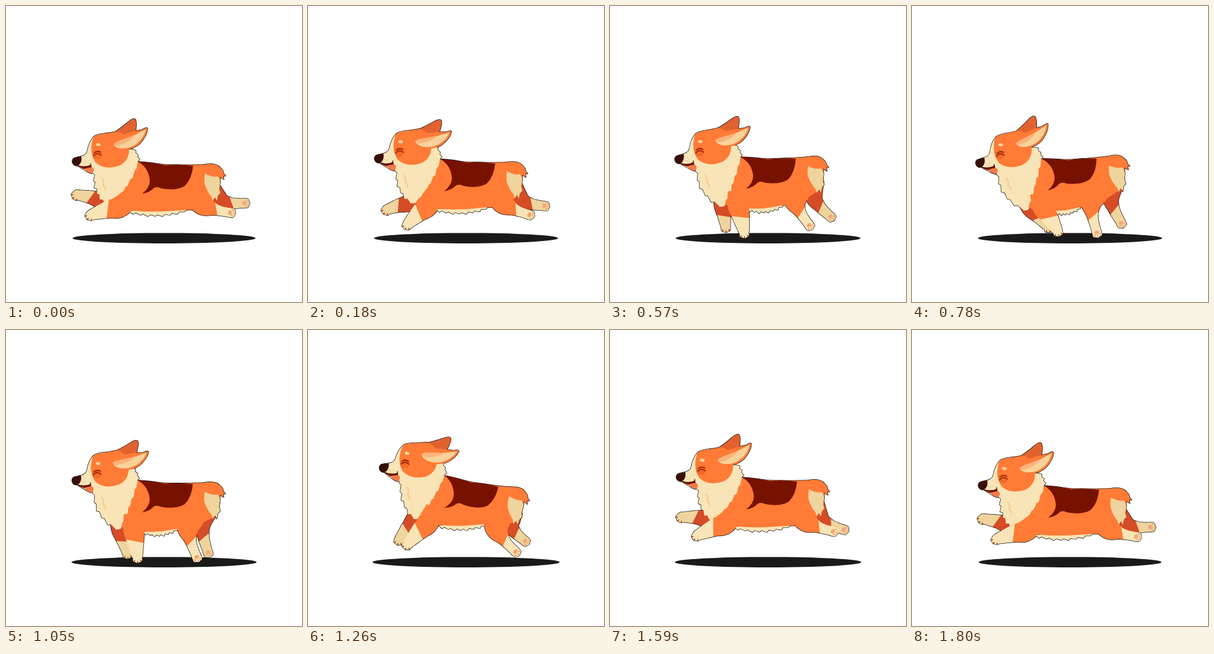
Animation, 500 px wide and 500 px high, one loop 1.83 s. Source, as an HTML page with a canvas:

```html
<!DOCTYPE html>
<html lang="en">
<head>
<meta charset="utf-8">
<title>Running corgi</title>
<style>
html, body { margin: 0; width: 100%; height: 100%; overflow: hidden; background: #fff; }
canvas { display: block; width: 500px; height: 500px; }
</style>
</head>
<body>
<canvas id="stage" width="500" height="500"></canvas>
<script>
const ctx = document.getElementById('stage').getContext('2d');

const LOOP = 1830, STRIDE = 1800, STEP = 30;

const C = {
  orange: '#ff7b36', deep: '#d54c26', ear: '#e0622f', cream: '#f8e4b6',
  tan: '#efd49d', patch: '#781200', dark: '#380e06', red: '#8c1c08',
  pad: '#f2a779', shadow: '#1a1a1a'
};

// time, withers height, body turn, then the paws: near fore, far fore, near hind, far hind
const KEYS = [
  [0, 263, 0, 143, 353, 120, 319, 378, 349, 402, 333],
  [360, 253, 0, 197, 382, 154, 367, 363, 357, 390, 345],
  [780, 258, -4.5, 246, 380, 230, 373, 312, 382, 353, 366],
  [1050, 254, -.5, 222, 384, 205, 377, 322, 383, 341, 375],
  [1260, 246, 7.4, 168, 362, 154, 354, 350, 374, 366, 356],
  [1425, 242, 4, 154, 348, 131, 329, 365, 353, 382, 342],
  [1590, 249, 0, 147, 347, 121, 316, 376, 340, 394, 337]
];

// Rest positions that parts turn about.
const WITHERS = [223, 263], EYE = [153, 250], EAR = [185, 228];

// hip, half widths, joints as [share of the leg, bow per forward reach, fixed bow]
const FORE = { hip: [213, 319], widths: [15, 18, 14.5, 8.5], joints: [[.35, .12, 0], [.62, .06, 0]], skew: .2 };
const FORE_FAR = { ...FORE, hip: [187, 325], widths: [13, 14, 11, 8], joints: [[.35, .08, 0], [.66, .03, 0]] };
const HIND = { hip: [318, 310], widths: [26, 20, 9.5, 7.5], joints: [[.38, 0, -12], [.68, 0, -9]], skew: -.2, pads: true };
const HIND_FAR = { ...HIND, hip: [345, 308], widths: [16, 14, 9.5, 7.5] };

const back = [[200, 262], [223, 263], [270, 269], [335, 268], [357, 267], [362, 290], [358, 318], [348, 328]];

const shape = d => new Path2D(d);
const tail = shape('M333 268 Q354 264 361 273 Q367 278 366 282 L370 287 L366 287 L367 293 L361 289 L356 288 L338 292Z');
const rump = shape('M335 283 Q333 296 335 302 Q339 314 346 322 L348 329 L352 323 L355 329 L357 320 L361 316 L359 308 L361 298 Q359 290 357 288 Q347 290 335 283Z');
const saddle = shape('M222 263 Q245 264 268 269 Q290 267 315 270 Q313 292 301 304 Q286 313 261 308 Q253 304 248 308 Q242 315 229 317 Q242 307 242 295 Q240 273 222 263Z');
const skull = shape('M111 263 Q112 257 122 255 Q134 253 136 246 Q139 229 148 220 Q155 216 168 215 L205 238 L200 270 L152 280 Q146 283 139 281 Q128 276 121 270Z');
const face = shape('M147 221 C155 215 170 216 185 212 Q206 214 207 242 Q207 262 190 270 Q165 278 150 264 Q143 253 143 240 Q144 227 147 221Z');
const nose = shape('M111 263 Q111 257 117 256 L126 254 Q128 262 123 268 L118 270 Q112 269 111 263Z');
const jaw = shape('M119 269 Q132 273 143 268 L144 275 Q134 280 119 269Z');
const tongue = shape('M132 275 Q140 272 146 273 Q150 279 143 283 Q135 281 132 275Z');
const smile = shape('M119 269 Q132 274 140 271 Q143 269 142 266');
const lids = shape('M147 253 Q153 246 160 252 M148 248 Q153 244 159 247');
const mark = shape('M161 291 Q166 297 163 303 Q168 306 167 311');
const farEar = shape('M170 222 Q190 208 204 195 Q212 187 216 190 Q219 196 217 212 L200 226Z');
const nearEar = shape('M178 231 C184 219 210 211 228 207 Q237 201 237 205 Q237 216 226 230 Q215 241 200 242 Q184 242 178 231Z');
const earInside = shape('M181 234 C186 227 206 223 222 213 L234 206 C232 222 218 236 204 239 Q187 243 181 234Z');
const earShade = shape('M181 234 C186 227 203 224 216 217 Q209 228 192 235 Q184 238 181 234Z');

// Smooth curve through the key poses, closed over one stride.
function pose(t) {
  const n = KEYS.length;
  const key = i => KEYS[(i + n) % n];
  const time = i => key(i)[0] + STRIDE * Math.floor(i / n);
  let i = n - 1;
  while (time(i) > t) i--;
  const span = time(i + 1) - time(i), u = (t - time(i)) / span;
  return key(i).map((a, k) => {
    const b = key(i + 1)[k];
    const ma = (b - key(i - 1)[k]) / (time(i + 1) - time(i - 1)) * span;
    const mb = (key(i + 2)[k] - a) / (time(i + 2) - time(i)) * span;
    return hermite(a, b, ma, mb, u);
  });
}

function hermite(a, b, ma, mb, u) {
  return a + u * (ma + u * (3 * (b - a) - 2 * ma - mb + u * (2 * (a - b) + ma + mb)));
}

const rad = deg => deg * Math.PI / 180;

function place([x, y], [rx, ry], [px, py, turn]) {
  const c = Math.cos(rad(turn)), s = Math.sin(rad(turn));
  return [px + (x - rx) * c - (y - ry) * s, py + (x - rx) * s + (y - ry) * c];
}

function within([rx, ry], [px, py, turn], draw) {
  ctx.save();
  ctx.translate(px, py);
  ctx.rotate(rad(turn));
  ctx.translate(-rx, -ry);
  draw();
  ctx.restore();
}

function poly(points) {
  const p = new Path2D();
  points.forEach(q => p.lineTo(...q));
  p.closePath();
  return p;
}

function soft(points) {
  const p = new Path2D(), n = points.length;
  for (let i = 0; i <= n; i++) {
    const [x, y] = points[i % n], [nx, ny] = points[(i + 1) % n];
    const mid = [(x + nx) / 2, (y + ny) / 2];
    if (i) p.quadraticCurveTo(x, y, ...mid);
    else p.moveTo(...mid);
  }
  return p;
}

function oval(x, y, rx, ry, turn = 0) {
  const p = new Path2D();
  p.ellipse(x, y, rx, ry, turn, 0, 7);
  return p;
}

// Fur edge along a quadratic curve; lean is where in its step each spike sits.
function tufts(a, c, b, count, depth, lean) {
  const at = (u, out) => {
    const v = 1 - u;
    const [x, y] = [0, 1].map(k => v * v * a[k] + 2 * u * v * c[k] + u * u * b[k]);
    const [dx, dy] = [0, 1].map(k => v * (c[k] - a[k]) + u * (b[k] - c[k]));
    const f = out / Math.hypot(dx, dy);
    return [x - dy * f, y + dx * f];
  };
  const points = [];
  for (let i = 0; i < count; i++) {
    points.push(at(i / count, 0), at((i + lean) / count, depth * (i % 2 ? .7 : 1)));
  }
  return [...points, b];
}

// The first pass draws only the dark rim, the second fills over it.
let rim = false;

function fill(path, color) {
  if (rim) {
    ctx.strokeStyle = '#111';
    ctx.lineWidth = 1.5;
    ctx.stroke(path);
  } else {
    ctx.fillStyle = color;
    ctx.fill(path);
  }
}

function line(path, color, width) {
  if (rim) return;
  ctx.strokeStyle = color;
  ctx.lineWidth = width;
  ctx.stroke(path);
}

function spline(v, u) {
  const i = Math.min(2, Math.floor(u));
  const at = k => v[Math.max(0, Math.min(3, k))];
  const a = at(i), b = at(i + 1);
  return hermite(a, b, (b - at(i - 1)) / 2, (at(i + 2) - a) / 2, u - i);
}

function limb(leg, body, px, py, color, sock) {
  const [hx, hy] = place(leg.hip, WITHERS, body);
  const lx = px - hx, ly = py - hy, len = Math.hypot(lx, ly);
  const joints = leg.joints.map(([u, reach, bow]) => {
    const b = (bow - reach * lx) / len;
    return [hx + lx * u + ly * b, hy + ly * u - lx * b];
  });
  const xs = [hx, joints[0][0], joints[1][0], px];
  const ys = [hy, joints[0][1], joints[1][1], py];

  const edge = (u, side) => {
    const lo = Math.max(0, u - .2), hi = Math.min(3, u + .2);
    const dx = spline(xs, hi) - spline(xs, lo), dy = spline(ys, hi) - spline(ys, lo);
    const w = side * spline(leg.widths, u) / Math.hypot(dx, dy);
    return [spline(xs, u) - dy * w, spline(ys, u) + dx * w];
  };
  // Each end is a share of the leg, skewed between the two sides.
  const part = (from, to) => {
    const side = s => Array.from({ length: 17 }, (_, i) => {
      const ends = [from, to].map(e => e > 0 && e < 3 ? e - s * leg.skew : e);
      return edge(ends[0] + (ends[1] - ends[0]) * i / 16, s);
    });
    return poly([...side(1), ...side(-1).reverse()]);
  };
  fill(part(0, 2.05), color);
  fill(part(2, 3), sock);
  paw(px, py, Math.atan2(py - ys[2], px - xs[2]), sock, leg.pads);
}

function paw(x, y, dir, color, pads) {
  const toe = pads ? dir : (dir < 0 ? dir + 2 * Math.PI : dir) * .5 + Math.PI / 4;
  const spot = (a, r) => [x + Math.cos(toe + a) * r, y + Math.sin(toe + a) * r];
  fill(oval(x, y, 9, 8, toe), color);
  for (const a of [-.75, 0, .75]) {
    fill(oval(...spot(a, 6), 3.8, 3.6), color);
    if (pads && !rim) fill(oval(...spot(a, 6.5), 1.9, 1.6, toe), C.pad);
    if (!pads) line(poly([spot(a, 7), spot(a, 9.3)]), C.red, 1.4);
  }
  if (pads && !rim) fill(oval(...spot(0, .5), 3.2, 4, toe), C.pad);
}

function drawHead(swing) {
  const ear = [...EAR, swing];
  within(EAR, ear, () => fill(farEar, C.ear));
  fill(skull, C.cream);
  fill(face, C.orange);
  fill(jaw, C.red);
  fill(tongue, '#f27a48');
  fill(nose, C.dark);
  line(smile, C.dark, 1.2);
  fill(oval(153, 251, 8, 8), '#f26a27');
  line(lids, C.red, 1.6);
  fill(oval(155, 234, 4, 2.4, .15), '#fbd9a2');
  for (let i = 0; i < 3; i++) fill(oval(128 + 3 * i, 264 + 2 * (i % 2), .6, .6), '#c98f55');
  within(EAR, ear, () => {
    fill(nearEar, C.orange);
    fill(earInside, '#f8d29a');
    fill(earShade, '#f9b47c');
  });
}

function drawDog(t, [, y, turn, nfx, nfy, ffx, ffy, nhx, nhy, fhx, fhy]) {
  const x = 224 + turn, body = [x, y, turn];
  const head = [...place(EYE, WITHERS, body), turn * .8];
  const onHead = p => place(p, EYE, head);

  // Chest and belly stretch with the reach of the near legs.
  const fore = nfx - x, hind = nhx - x;
  const tip = [x - 32 + .26 * fore, y + 83 + .15 * fore];
  const front = [x + 9 + .32 * fore, y + 87 + .05 * fore];
  const rear = [x + 42 + .25 * hind, y + 81];
  const middle = drop => [(front[0] + rear[0]) / 2, (front[1] + rear[1]) / 2 + drop];

  limb(HIND_FAR, body, fhx, fhy, C.deep, C.tan);
  limb(FORE_FAR, body, ffx, ffy, C.deep, C.tan);
  fill(poly(tufts(front, middle(15), rear, 8, 3.5, .7)), C.cream);

  const trunk = back.map(p => place(p, WITHERS, body));
  trunk.push([rear[0] + 20, rear[1] + 1], rear, middle(3), front, tip, [tip[0] + 8, tip[1] - 25]);
  fill(soft(trunk), C.orange);

  const chin = onHead([150, 272]), ruff = onHead([222, 262]), nape = onHead([212, 242]);
  fill(poly([
    ...tufts(chin, [chin[0] - 5, chin[1] + (tip[1] - chin[1]) * .68], tip, 6, 4, .75),
    ...tufts(tip, onHead([206, 313]), ruff, 6, 2.5, .25),
    ...tufts(ruff, onHead([222, 250]), nape, 3, 3, .3),
    onHead([170, 245])
  ]), C.cream);

  limb(HIND, body, nhx, nhy, C.orange, C.cream);
  limb(FORE, body, nfx, nfy, C.orange, C.cream);

  within(WITHERS, body, () => {
    fill(tail, C.orange);
    fill(rump, C.tan);
    fill(saddle, C.patch);
  });
  within(EYE, head, () => {
    line(mark, '#f6ca94', 2.2);
    drawHead(9 - 9 * Math.cos(rad(720 * t / STRIDE + 45)));
  });
}

function frame(now) {
  const t = Math.floor(now % LOOP / STEP) * STEP % STRIDE;
  const now_pose = pose(t);
  ctx.clearRect(0, 0, 500, 500);
  ctx.lineJoin = ctx.lineCap = 'round';

  // The shadow widens as the body rises.
  ctx.fillStyle = C.shadow;
  ctx.fill(oval(267, 392.2, 154.5 + (263 - now_pose[1]) * .21, 8.8));
  for (rim of [true, false]) drawDog(t, now_pose);
}

let start;
function tick(now) {
  start ??= now;
  frame(now - start);
  requestAnimationFrame(tick);
}
frame(0);
requestAnimationFrame(tick);
</script>
</body>
</html>
```
